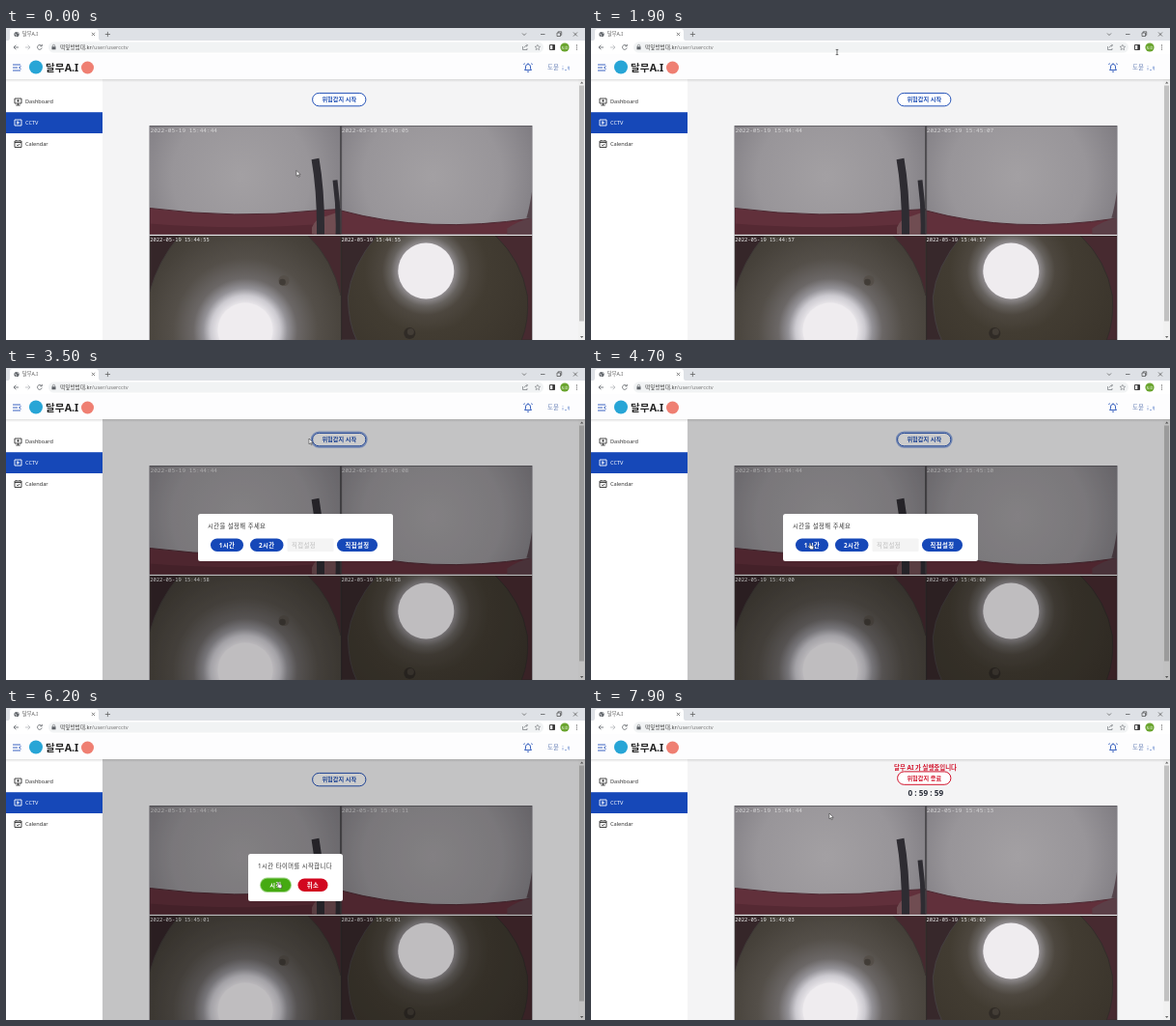
An HTML page for the animation above (8000 ms loop, 600 px wide and 323 px high).

```html
<!DOCTYPE html>
<html lang="ko">
<head>
<meta charset="utf-8">
<style>
html, body { margin: 0; width: 100%; height: 100%; overflow: hidden; background: #fff }
svg { display: block }
text { font-family: "Noto Sans", "Noto Sans CJK KR", "Noto Sans CJK JP", sans-serif; white-space: pre }
.mid { text-anchor: middle }
.b { font-weight: 700 }
.mono { font-family: "Noto Sans Mono", "DejaVu Sans Mono", monospace; fill: #eee }
.line { fill: none; stroke-width: .9 }
.dialog { letter-spacing: .45px; font-size: 6.3px }
</style>
</head>
<body>
<svg id="stage" width="600" height="323" viewBox="0 0 600 323">
<defs>
  <radialGradient id="wall" gradientUnits="userSpaceOnUse" cx="95" cy="52" r="130">
    <stop offset="0" stop-color="#a3a0a3"/><stop offset=".55" stop-color="#989599"/><stop offset="1" stop-color="#77747a"/>
  </radialGradient>
  <radialGradient id="glow">
    <stop offset=".18" stop-color="#ece9ed"/><stop offset=".24" stop-color="#cccad0"/><stop offset=".29" stop-color="#949297"/>
    <stop offset=".36" stop-color="#6b6766"/><stop offset=".5" stop-color="#544f49"/><stop offset=".7" stop-color="#47423b"/><stop offset="1" stop-color="#37322c"/>
  </radialGradient>
  <radialGradient id="halo">
    <stop offset=".19" stop-color="#918d90"/><stop offset=".24" stop-color="#66625e"/><stop offset=".3" stop-color="#4d473f"/>
    <stop offset=".42" stop-color="#423c32"/><stop offset="1" stop-color="#363028"/>
  </radialGradient>
  <linearGradient id="drop" x2="0" y2="1"><stop stop-color="#000" stop-opacity=".12"/><stop offset="1" stop-color="#000" stop-opacity="0"/></linearGradient>
</defs>

<!-- browser -->
<rect width="600" height="13" fill="#dee1e6"/>
<path d="M2 13Q4 13 4 10V3.500Q4 1 6.500 1H93Q96 1 96 4V10Q96 13 98 13Z" fill="#fff"/>
<circle cx="11" cy="6.500" r="2.600" fill="#5f6368"/>
<path d="M9 6L11 7L10.500 8.700M11.500 4.500L12.800 6" class="line" stroke="#fff" style="stroke-width:.6"/>
<text x="17" y="8.300" font-size="5.200" fill="#555">달무A.I</text>
<path d="M88.800 4.800l3.200 3.200m0-3.200l-3.200 3.200M102.800 6.500h5.200m-2.600-2.600v5.200" class="line" stroke="#555" style="stroke-width:.7"/>
<path d="M535 5.500l2 2 2-2M554 6.500h4.500M571 5h3.500v3.500H571zM572.200 5V3.800h3.500v3.500h-1.200M588 4.500l4 4m0-4l-4 4" class="line" stroke="#333" style="stroke-width:.6"/>
<rect y="13" width="600" height="14" fill="#fff"/>
<rect x="44" y="14.500" width="513" height="11" rx="5.500" fill="#f1f3f4"/>
<g class="line" stroke="#5f6368" style="stroke-width:.8">
  <path d="M13 20H8m2.300-2.300L8 20l2.300 2.300M36.800 18.500a2.400 2.400 0 1 0 .4 2M37.300 16.800v2h-2"/>
  <path d="M20 20h5m-2.300-2.300L25 20l-2.300 2.300" stroke="#b5b8bb"/>
  <path d="M48.300 19.500v-1a1.200 1.200 0 0 1 2.400 0v1M535.500 19v3.500h4.500V21M537 20.500q.5-2.500 3.500-2.500m-1.300-1.300l1.300 1.300-1.300 1.300" style="stroke-width:.6"/>
  <path d="M550.800 17.300l.8 1.800 2 .2-1.500 1.300.4 2-1.700-1-1.700 1 .4-2-1.500-1.300 2-.2z" style="stroke-width:.5"/>
</g>
<rect x="47.500" y="19.300" width="4" height="3" fill="#5f6368"/>
<text x="56" y="22" font-size="5.650" fill="#444">떡잎방범대.kr<tspan fill="#777">/user/usercctv</tspan></text>
<path d="M563.500 17.500h5v5h-5z" class="line" stroke="#333"/><path d="M566.300 17.500h2.200v5h-2.200z" fill="#333"/>
<circle cx="579" cy="20" r="4.600" fill="#6aa52f"/>
<text x="579" y="21.500" class="mid" font-size="3.800" fill="#fff">도윤</text>
<g fill="#555"><circle cx="591.500" cy="17.900" r=".6"/><circle cx="591.500" cy="20" r=".6"/><circle cx="591.500" cy="22.100" r=".6"/></g>

<!-- page -->
<rect x="100" y="53" width="500" height="270" fill="#f4f4f5"/>
<rect y="53" width="100" height="270" fill="#fff"/>
<rect y="87.200" width="100" height="21.800" fill="#1648b8"/>
<g class="line" stroke="#333">
  <path d="M9 73h7v5H9zM12.500 78v2M10.300 80h4.400M12.500 74.200v2.400m-1.200-1.200h2.400"/>
  <path d="M9 95h7v6H9z M11.700 96.700v2.600l2-1.300z" stroke="#fff"/>
  <path d="M9 117h7v6.500H9zM9 118.500h7M10.800 116v1M14.200 116v1M11 120.800l1.200 1.100 2-2"/>
</g>
<g font-size="5.600" fill="#333">
  <text x="20" y="78.400">Dashboard</text><text x="20" y="100.200" fill="#fff">CCTV</text><text x="20" y="122.100">Calendar</text>
</g>
<rect x="593" y="53" width="7" height="270" fill="#f1f1f1"/>
<rect x="594" y="59.500" width="5" height="244" fill="#c1c1c1"/>
<path d="M595 57.500l1.700-2 1.700 2zM595 319l1.700 2 1.700-2z" fill="#666"/>

<g id="start">
  <rect id="ring" x="316.500" y="66.200" width="57.500" height="15.800" rx="7.900" fill="none" stroke="#8fa9df" stroke-width="1.300"/>
  <rect x="317.600" y="67.400" width="55.300" height="13.400" rx="6.700" fill="#fff" stroke="#2452b8"/>
  <text x="345.300" y="76.200" class="mid b" font-size="6.200" fill="#1f4fb5">위험감지 시작</text>
</g>
<g id="run" class="mid b">
  <text x="346.500" y="63.700" font-size="6.400" fill="#d2132c">달무 AI 가 실행중입니다</text>
  <rect x="317.600" y="65.900" width="55.300" height="13.400" rx="6.700" fill="#fff" stroke="#d2132c"/>
  <text x="345.300" y="74.600" font-size="6.200" fill="#d2132c">위험감지 종료</text>
  <text id="timer" x="346.800" y="91.200" font-size="8.200" fill="#2b2f3a"></text>
</g>

<!-- cameras -->
<rect x="148.600" y="101" width="396.800" height="222" fill="#56545a"/>
<rect x="148.600" y="213.600" width="396.800" height="1.400" fill="#e9e9ea"/>
<svg x="149" y="101.500" width="198" height="112.100">
  <rect width="198" height="113" fill="url(#wall)"/>
  <path d="M0 85Q90 96.500 171 87.500L198 86V113H0Z" fill="#61303b" stroke="#4c2932"/>
  <path d="M0 101Q90 108 170 102V113H0Z" fill="#552933"/>
  <path d="M168 105Q172 95 184 93L198 88V113H168Z" fill="#704d52"/>
  <path d="M171.500 34Q177.500 68 177 113" class="line" stroke="#2e2c32" style="stroke-width:8"/>
  <path d="M192 56Q196 85 195 113" class="line" stroke="#2e2c32" style="stroke-width:5"/>
  <path d="M197.700 0V113" class="line" stroke="#3d3a3e"/>
  <text class="mono" x=".5" y="6.700" font-size="6.100" opacity=".75">2022-05-19 15:44:44</text>
</svg>
<svg x="347.300" y="101.500" width="197.700" height="112.100">
  <rect width="198" height="113" fill="url(#wall)"/>
  <path d="M0 87.500Q90 112 198 95.500V113H0Z" fill="#61303b" stroke="#4c2932"/>
  <path d="M172 106Q184 98 198 95V113H172Z" fill="#5b3f47"/>
  <path d="M198 66Q195 86 192 95L198 96Z" fill="#55454c"/>
  <path d="M.3 0V113" class="line" stroke="#3d3a3e"/>
  <text class="mono" id="lead" x=".5" y="6.700" font-size="6.100" opacity=".75"></text>
</svg>
<svg x="149" y="215" width="198" height="108">
  <rect width="198" height="108" fill="#37322c"/>
  <circle cx="99" cy="98" r="150" fill="url(#glow)"/>
  <circle cx="99" cy="98" r="28.500" fill="#efecef"/>
  <path d="M0 0H31Q9 25 0 58Z" fill="#352629" stroke="#3f3a38"/>
  <path d="M164 0Q189 24 198 62V0Z" fill="#46292f" stroke="#3a3331"/>
  <circle cx="139" cy="46.500" r="5.500" fill="#554f49"/><circle cx="137.500" cy="48" r="3.300" fill="#413c37"/>
  <text class="mono clock" x=".3" y="5.500" font-size="5.400"></text>
</svg>
<svg x="347.300" y="215" width="197.700" height="108">
  <rect width="198" height="108" fill="#363028"/>
  <circle cx="88" cy="36.500" r="152" fill="url(#halo)"/>
  <circle cx="88" cy="36.500" r="29" fill="#efecef"/>
  <path d="M0 0H37Q10 32 7 64Q8 92 16 108H0Z" fill="#37282b" stroke="#443f40"/>
  <path d="M160 0Q187 26 193 62Q195 88 187 108H198V0Z" fill="#472a30" stroke="#332c2a"/>
  <circle cx="71" cy="101" r="6" fill="#302b26"/><circle cx="72" cy="99.500" r="3.500" fill="#433d36"/>
  <path d="M.3 0V108" class="line" stroke="#262321"/>
  <text class="mono clock" x=".3" y="5.500" font-size="5.400"></text>
</svg>

<rect id="shade" x="100" y="53" width="500" height="270"/>

<!-- app header -->
<rect y="27" width="600" height="26" fill="#fdfdfe"/>
<rect y="53" width="600" height="3" fill="url(#drop)"/>
<path d="M7 38h8M7 41h5M7 44h8M15.500 39.500l-2 1.500 2 1.500" class="line" stroke="#2452b8"/>
<circle cx="31" cy="40.500" r="7" fill="#27a5d6"/>
<text x="41" y="44.700" class="b" font-size="10.700" fill="#222">달무A.I</text>
<circle cx="84.500" cy="41" r="6.500" fill="#ef7f72"/>
<g class="line" stroke="#2452b8">
  <path d="M537.500 43.500h7l-1-1.500v-2a2.500 2.500 0 0 0-5 0v2zM540 45.200h2M541 36.300v1M536.500 38l1-1.500M545.500 38l-1-1.500"/>
  <path d="M577 39v.8M577 41v2.500M579 43.500h2M583 39.500v3.500h1M581.800 41h2.400" stroke="#6f8fce" style="stroke-width:.7"/>
</g>
<text x="561" y="42.500" font-size="6.500" fill="#6b83b8">도윤</text>

<g id="hours" class="dialog">
  <rect x="199" y="151" width="202" height="49" rx="2.500" fill="#fff"/>
  <text x="209" y="166" fill="#333">시간을 설정해 주세요</text>
  <rect x="291.500" y="176.500" width="48" height="13.500" rx="1" fill="#f4f4f4"/>
  <text x="296" y="185.600" fill="#bcbcbc">직접설정</text>
</g>
<g id="confirm" class="dialog">
  <rect x="251" y="151" width="98" height="49" rx="2.500" fill="#fff"/>
  <text x="299.500" y="166" class="mid" fill="#333">1시간 타이머를 시작합니다</text>
</g>
<g id="cursor">
  <path id="arrow" d="M0 0V5.800L1.400 4.600 2.300 6.700 3.200 6.300 2.300 4.300H4.100Z" fill="#fff" stroke="#222" stroke-width=".5"/>
  <path id="hand" d="M-.2 3.500V.6Q.4-.2 1 .6V2.600L4 3.300 3.600 6.500H.8L-1.300 4Z" fill="#fff" stroke="#222" stroke-width=".5"/>
  <path id="beam" d="M-1.300-2.600H1.300M0-2.600V2.600M-1.300 2.600H1.300" class="line" stroke="#333" style="stroke-width:.7"/>
</g>
</svg>
<script>
const $ = id => document.getElementById(id);
const show = (id, on) => $(id).setAttribute('visibility', on ? 'visible' : 'hidden');
const clamp = v => Math.max(0, Math.min(1, v));

function addButton(dialog, x, w, label, color, id = '') {
  $(dialog).innerHTML += `<rect id="${id}" x="${x - 1}" y="175.500" width="${w + 2}" height="15.500" rx="7.750" fill="${color}" opacity="${id ? .5 : 0}"/>
    <rect x="${x}" y="176.500" width="${w}" height="13.500" rx="6.750" fill="${color}"/>
    <text x="${x + w / 2}" y="185.600" class="mid b" fill="#fff">${label}</text>`;
}
addButton('hours', 212, 34, '1시간', '#1648b8');
addButton('hours', 253, 34.500, '2시간', '#1648b8');
addButton('hours', 343, 42, '직접설정', '#1648b8');
addButton('confirm', 264, 31, '시작', '#45aa12', 'startRing');
addButton('confirm', 302.500, 31, '취소', '#d2061f');

// pointer stops: time, x, y
const stops = [[0, 301, 147.500], [800, 262, 24], [1900, 255, 25], [2100, 256, 25], [3100, 338, 73],
  [3350, 337, 73], [3500, 314, 73], [4500, 228, 182], [5200, 222, 178], [5450, 222, 178],
  [6000, 282, 180], [6450, 282, 180], [7200, 256, 116], [7900, 247, 109], [8000, 247, 109]];

function pointer(t) {
  const i = stops.findIndex(s => s[0] > t), [a, x, y] = stops[i - 1], [b, u, v] = stops[i];
  const p = (t - a) / (b - a), e = p * p * (3 - 2 * p);
  return [x + (u - x) * e, y + (v - y) * e];
}

// fade and slide; returns how far the dialog is open
function dialog(id, t, open, close) {
  const p = clamp((t - open) / 200) * (1 - clamp((t - close) / 150));
  $(id).setAttribute('opacity', p);
  $(id).setAttribute('transform', `translate(0 ${-19 * (1 - p)})`);
  return p;
}

function stamp(s) {
  const n = 55 + s, two = v => String(v).padStart(2, '0');
  return `2022-05-19 15:${44 + Math.floor(n / 60)}:${two(n % 60)}`;
}

function draw(t) {
  const sec = Math.floor(t / 1000 + .3);
  document.querySelectorAll('.clock').forEach(e => e.textContent = stamp(sec));
  $('lead').textContent = stamp(sec + 10);

  const first = dialog('hours', t, 3280, 5150), second = dialog('confirm', t, 5380, 6450);
  const open = Math.max(first, second);
  $('shade').setAttribute('opacity', .2 * open * open);

  const running = t >= 6600;
  show('start', !running);
  show('run', running);
  $('timer').textContent = t < 7600 ? '1 : 00 : 00' : '0 : 59 : 59';

  const [x, y] = pointer(t);
  const over = (l, r, top, bottom) => x > l && x < r && y > top && y < bottom;
  const onMain = !running && over(317, 373, 67, 81);
  const onHour = first > .5 && over(212, 246, 176, 190);
  const onStart = second > .5 && over(264, 295, 176, 190);
  const beam = y > 14 && y < 27, hand = onMain || onHour || onStart;
  show('ring', !running && (onMain || t > 3200 && t < 5150));
  show('startRing', onStart);
  show('beam', beam);
  show('hand', hand);
  show('arrow', !beam && !hand);
  $('cursor').setAttribute('transform', `translate(${x} ${y})`);
}

function tick() {
  draw(performance.now() % 8000);
  requestAnimationFrame(tick);
}
tick();
</script>
</body>
</html>
```
